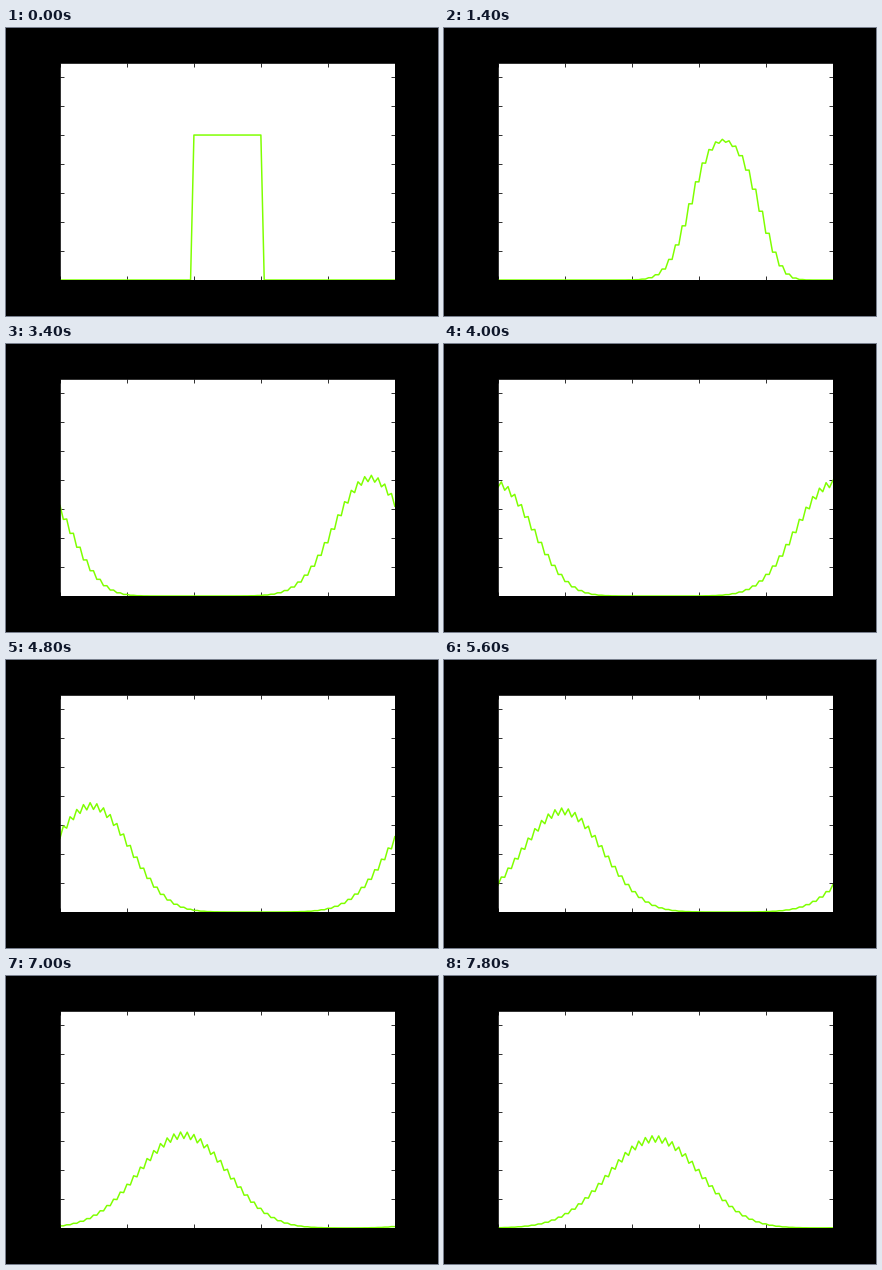
Recreate the animation shown at these times as a matplotlib script. Size 432x288 px, loop 8000 ms.

```python
import numpy as np
import matplotlib.pyplot as plt
from matplotlib.animation import FuncAnimation

# Advection of a square pulse with the Lax scheme on a periodic grid.
CELLS = 101
COURANT = 0.5
STEPS_PER_FRAME = 5
FRAMES = 40
INTERVAL = 200


def lax_step(u):
    left, right = np.roll(u, 1), np.roll(u, -1)
    return 0.5 * (left + right) - 0.5 * COURANT * (right - left)


def solve():
    index = np.arange(CELLS)
    u = np.where((index >= 40) & (index <= 60), 1.0, 0.0)
    states = [u]
    for _ in range(FRAMES - 1):
        for _ in range(STEPS_PER_FRAME):
            u = lax_step(u)
        states.append(u)
    return states


x = np.linspace(0, 1, CELLS)
states = solve()

fig = plt.figure(figsize=(6, 4), dpi=72, facecolor="black")
ax = fig.add_axes([0.125, 0.125, 0.775, 0.755], facecolor="white")
ax.set_xlim(0, 1)
ax.set_ylim(0, 1.5)
ax.set_xticks(np.arange(0, 1.01, 0.2))
ax.set_yticks(np.arange(0, 1.41, 0.2))
ax.tick_params(direction="in", top=True, right=True, length=4, width=0.8,
               labelbottom=False, labelleft=False)
for spine in ax.spines.values():
    spine.set_linewidth(0.8)
line, = ax.plot(x, states[0], color="#7fff00", lw=1.5)


def draw(frame):
    line.set_ydata(states[frame])
    return line,


anim = FuncAnimation(fig, draw, frames=FRAMES, interval=INTERVAL,
                     init_func=lambda: draw(0), repeat=True, repeat_delay=0)
plt.show()
```
